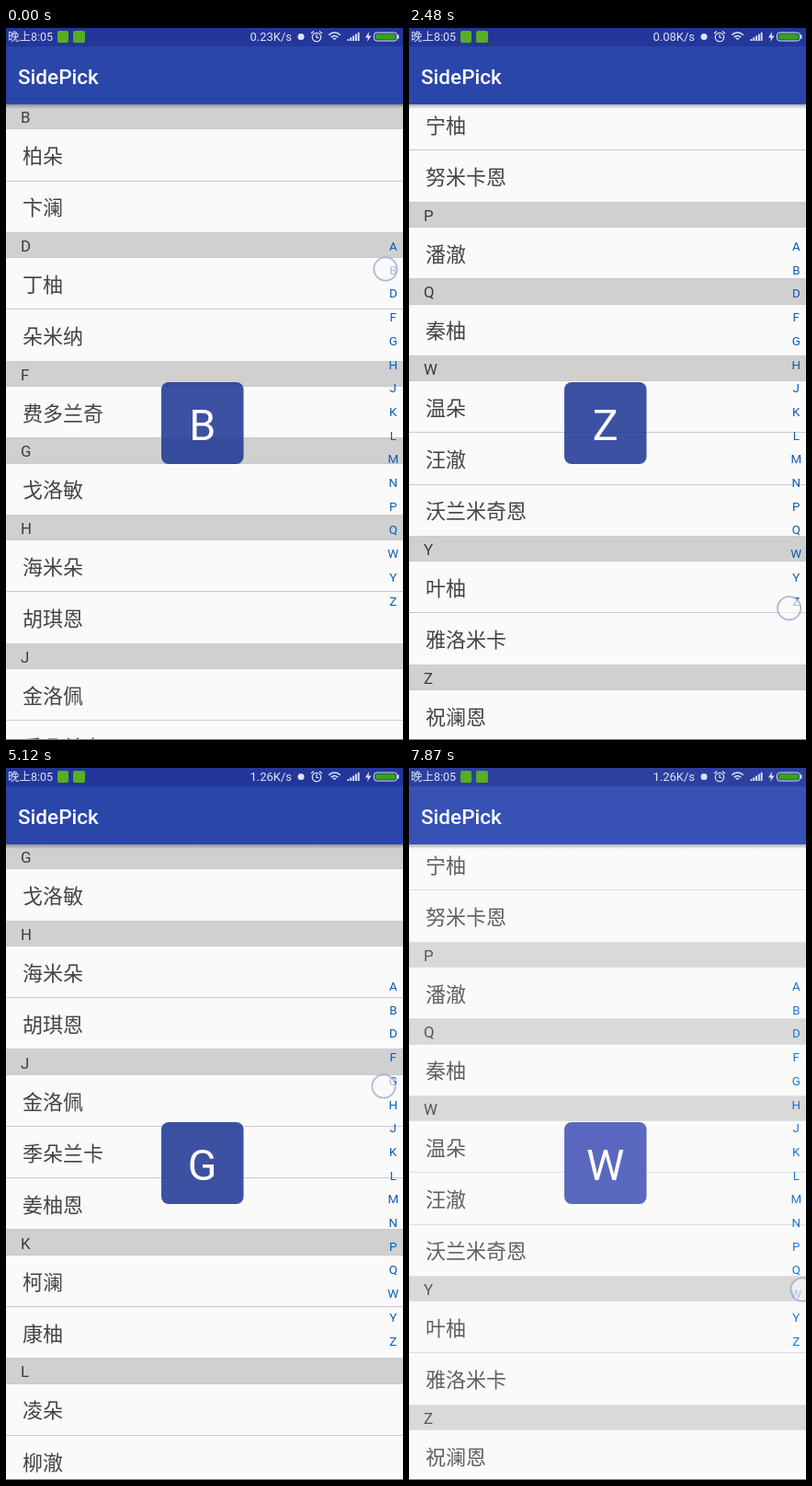
An HTML page with a canvas that plays this animation: 432 by 774 pixels, repeating every 7.99 s.

```html
<!DOCTYPE html>
<html lang="zh">
<head>
<meta charset="utf-8">
<title>SidePick</title>
<style>
html, body { margin: 0; height: 100%; overflow: hidden; background: #fafafa; }
canvas { display: block; width: 100vw; height: 100vh; }
</style>
</head>
<body>
<canvas id="stage" width="432" height="774"></canvas>
<script>
const ctx = document.getElementById('stage').getContext('2d');
const LOOP = 7990, STEP = 137;
const TOP = 83, HEADER = 27.4, ROW = 56.2;
const FONT = 'Roboto, "Noto Sans CJK SC", "Noto Sans CJK", sans-serif';

const sections = Object.entries({
  A: '安柚米 艾洛朵', B: '柏朵 卞澜', D: '丁柚 朵米纳', F: '费多兰奇', G: '戈洛敏',
  H: '海米朵 胡琪恩', J: '金洛佩 季朵兰卡 姜柚恩', K: '柯澜 康柚', L: '凌朵 柳澈',
  M: '梅朵兰奇', N: '宁柚 努米卡恩', P: '潘澈', Q: '秦柚', W: '温朵 汪澈 沃兰米奇恩',
  Y: '叶柚 雅洛米卡', Z: '祝澜恩'
}).map(([letter, names]) => ({ letter, names: names.split(' ') }));

let total = 0;
for (const s of sections) {
  s.offset = total;
  total += HEADER + ROW * s.names.length;
}
const maxScroll = sections.find(s => s.letter === 'N').offset + 33.2;

// Finger positions: time, hold, x, y
const touches = [
  [0, 120, 413, 262], [950, 150, 415.5, 387], [1640, 150, 420, 497],
  [2330, 140, 416, 612], [2750, 140, 409, 668], [3600, 140, 402, 564],
  [5120, 120, 411, 346], [5630, 140, 416, 256], [6560, 150, 425, 325],
  [7130, 740, 427, 436], [7870, 120, 428, 567]
];

const deep = {
  status: '#23379a', bar: '#2b46a9', header: '#d0d0d0', line: '#cacaca',
  label: '#3c3c3c', name: '#444', index: '#0a5cb5', toast: 'rgba(30,54,148,.86)'
};
const light = {
  status: '#2d409f', bar: '#3751b5', header: '#d9d9d9', line: '#e0e0e0',
  label: '#575757', name: '#606060', index: '#1b76d2', toast: 'rgba(63,81,181,.85)'
};

function fingerAt(t) {
  const i = touches.findLastIndex(k => k[0] <= t);
  const [start, hold, x, y] = touches[i], next = touches[i + 1];
  const end = start + hold;
  if (t < end || !next) return { x, y };
  const gap = next[0] - end, n = Math.max(1, Math.round(gap / STEP));
  const p = (Math.floor((t - end) / gap * n) + 1) / (n + 1);
  return { x: x + (next[2] - x) * p, y: y + (next[3] - y) * p };
}

function rect(x, y, w, h, color, r = 0) {
  ctx.fillStyle = color;
  ctx.beginPath();
  ctx.roundRect(x, y, w, h, r);
  ctx.fill();
}

// y is the middle of the capitals
function text(str, x, y, size, color, align = 'left', weight = 400) {
  ctx.font = `${weight} ${size}px ${FONT}`;
  ctx.textAlign = align;
  ctx.fillStyle = color;
  ctx.fillText(str, x, y + size * .36);
}

function arc(x, y, r, from = 0, to = Math.PI * 2) {
  ctx.beginPath();
  ctx.arc(x, y, r, from, to);
  ctx.stroke();
}

function drawList(scroll, c) {
  rect(0, TOP, 432, 691, '#fafafa');
  for (const s of sections) {
    let y = TOP + s.offset - scroll;
    rect(0, Math.round(y), 432, 27, c.header);
    rect(0, Math.round(y + HEADER) - 1, 432, 1, c.line);
    text(s.letter, 16, y + 14.2, 16.8, c.label);
    y += HEADER;
    for (const name of s.names) {
      text(name, 18, y + 28.9, 22, c.name);
      y += ROW;
      rect(0, Math.round(y) - 1, 432, 1, c.line);
    }
  }
}

function drawStatus(speed, c) {
  const ink = '#dfe4f6';
  rect(0, 0, 432, 20, c.status);
  text('晚上8:05', 2, 9.5, 12.5, ink);
  rect(56, 3, 12, 13, '#58ad22', 2);
  rect(73, 3, 13, 13, '#58ad22', 2);
  text(speed, 311, 9.5, 13, ink, 'right');
  rect(317.5, 6, 7, 7, ink, 3.5);

  ctx.strokeStyle = ink;
  ctx.lineWidth = 1.2;
  arc(338, 10, 4.7);
  ctx.beginPath();
  ctx.moveTo(338, 7); ctx.lineTo(338, 10.5); ctx.lineTo(340.5, 10.5);
  ctx.moveTo(332, 6); ctx.lineTo(335, 3.5);
  ctx.moveTo(341, 3.5); ctx.lineTo(344, 6);
  ctx.stroke();
  ctx.lineWidth = 1.6;
  for (const r of [2, 5, 8.5]) arc(357.5, 13.5, r, -2.4, -.74);
  for (let i = 0; i < 5; i++) rect(371.5 + i * 2.8, 12 - i * 1.8, 1.9, 2 + i * 1.8, ink);

  ctx.fillStyle = ink;
  ctx.beginPath();
  for (const [x, y] of [[395, 4], [391, 10.5], [394, 10.5], [393, 15], [397.5, 8.5], [394.5, 8.5]]) ctx.lineTo(x, y);
  ctx.fill();
  ctx.lineWidth = 1;
  ctx.beginPath();
  ctx.roundRect(400.5, 5, 25, 9, 3);
  ctx.stroke();
  rect(402, 6.5, 22, 6, '#35a50e', 2);
  rect(426, 7.5, 1.5, 4, ink);
}

function draw(t) {
  const c = t < 6000 ? deep : light;
  const finger = fingerAt(t);
  const index = Math.round((finger.y - 237) / 25.7);
  const section = sections[Math.min(Math.max(index, 0), sections.length - 1)];

  drawList(Math.min(section.offset, maxScroll), c);
  sections.forEach((s, i) => text(s.letter, 421.3, 237.2 + i * 25.7, 13.4, c.index, 'center'));

  const shadow = ctx.createLinearGradient(0, TOP, 0, TOP + 5);
  shadow.addColorStop(0, 'rgba(0,0,0,.3)');
  shadow.addColorStop(1, 'rgba(0,0,0,0)');
  rect(0, TOP, 432, 5, shadow);
  rect(0, 20, 432, 63, c.bar);
  text('SidePick', 13, 53, 22.5, '#fff', 'left', 500);
  drawStatus(t < 1300 ? '0.23K/s' : t < 4700 ? '0.08K/s' : '1.26K/s', c);
  rect(0, 773, 432, 1, '#808080');

  if (t < 7560 || t >= 7870) {
    rect(169, 385, 89.5, 89, c.toast, 8);
    text(section.letter, 213.7, 431.7, 46.5, '#fff', 'center');
  }
  if (t < 7410 || t >= 7870) {
    rect(finger.x - 13, finger.y - 13, 26, 26, 'rgba(250,250,250,.62)', 13);
    ctx.strokeStyle = 'rgba(150,162,205,.75)';
    ctx.lineWidth = 1.8;
    arc(finger.x, finger.y, 12.6);
  }
}

function frame() {
  draw(performance.now() % LOOP);
  requestAnimationFrame(frame);
}
frame();
</script>
</body>
</html>
```
